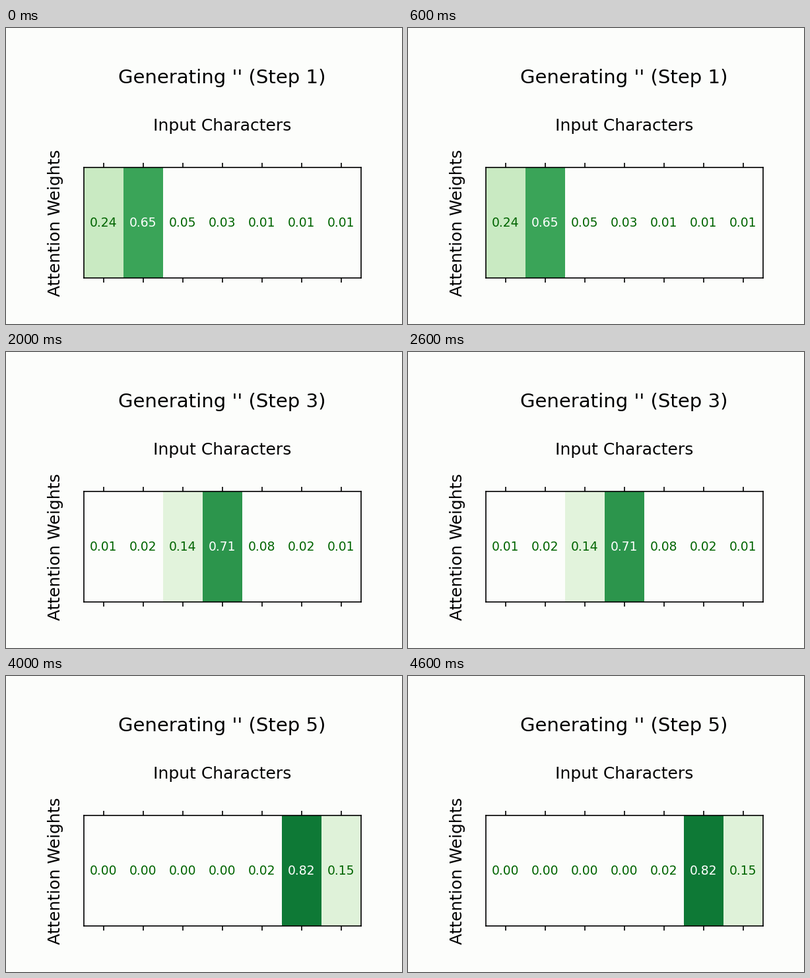
These frames come from a looping animation (600 by 450 pixels, 5000 ms). A matplotlib script:

```python
import matplotlib.pyplot as plt
import numpy as np
from matplotlib.animation import FuncAnimation

W, H, DPI = 600, 450, 150
LEFT, RIGHT, TOP, BOTTOM = 118, 538, 212, 380
COLS = 7
PAPER = "#fcfdfb"
FAINT = 0.12
STEP_MS = 1000

# Per step: focused column, then the weight before it, on it and after it.
FOCUS = [
    (1, 0.24, 0.65, 0.05),
    (1, 0.09, 0.42, 0.35),
    (3, 0.14, 0.71, 0.08),
    (5, 0.04, 0.85, 0.10),
    (5, 0.02, 0.824, 0.15),
]


def attention(step):
    """Weights around the focus; the rest fades with squared distance."""
    col, *near = FOCUS[step]
    dist = np.abs(np.arange(COLS) - col)
    tail = np.where(dist > 1, 1 / np.maximum(dist, 1) ** 2, 0)
    row = tail / tail.sum() * (1 - sum(near))
    row[col - 1:col + 2] = near
    return row


plt.rcParams["font.family"] = "DejaVu Sans"
fig = plt.figure(figsize=(W / DPI, H / DPI), dpi=DPI, facecolor=PAPER)
ax = fig.add_axes(
    [LEFT / W, 1 - BOTTOM / H, (RIGHT - LEFT) / W, (BOTTOM - TOP) / H],
    facecolor=PAPER,
)


def label(x, y, text, size, **kw):
    """Text centred on x with its baseline at y, in pixels from the top left."""
    return fig.text(x / W, 1 - y / H, text, fontsize=size,
                    ha="center", va="baseline", **kw)


heat = ax.imshow(np.zeros((1, COLS)), cmap="Greens", vmin=0, vmax=1,
                 aspect="auto", interpolation="nearest")
ax.set_xticks(range(COLS))
ax.set_yticks([])
ax.tick_params(axis="x", top=True, bottom=True,
               labeltop=False, labelbottom=False)

title = label(326.75, 84, "", 14)
label(327.75, 156, "Input Characters", 12)
label(82, (TOP + BOTTOM) / 2, "Attention Weights", 12,
      rotation=90, rotation_mode="anchor")
values = [ax.text(col, 0, "", fontsize=9, ha="center", va="center")
          for col in range(COLS)]


def draw(step):
    row = attention(step)
    title.set_text(f"Generating '' (Step {step + 1})")
    heat.set_data(np.ma.masked_less(row[np.newaxis, :], FAINT))
    for text, weight in zip(values, row):
        text.set_text(f"{weight:.2f}")
        text.set_color("white" if weight > 0.5 else "darkgreen")
    return [heat, title, *values]


anim = FuncAnimation(fig, draw, frames=len(FOCUS), interval=STEP_MS,
                     repeat=True, repeat_delay=0, blit=False)
plt.show()
```
